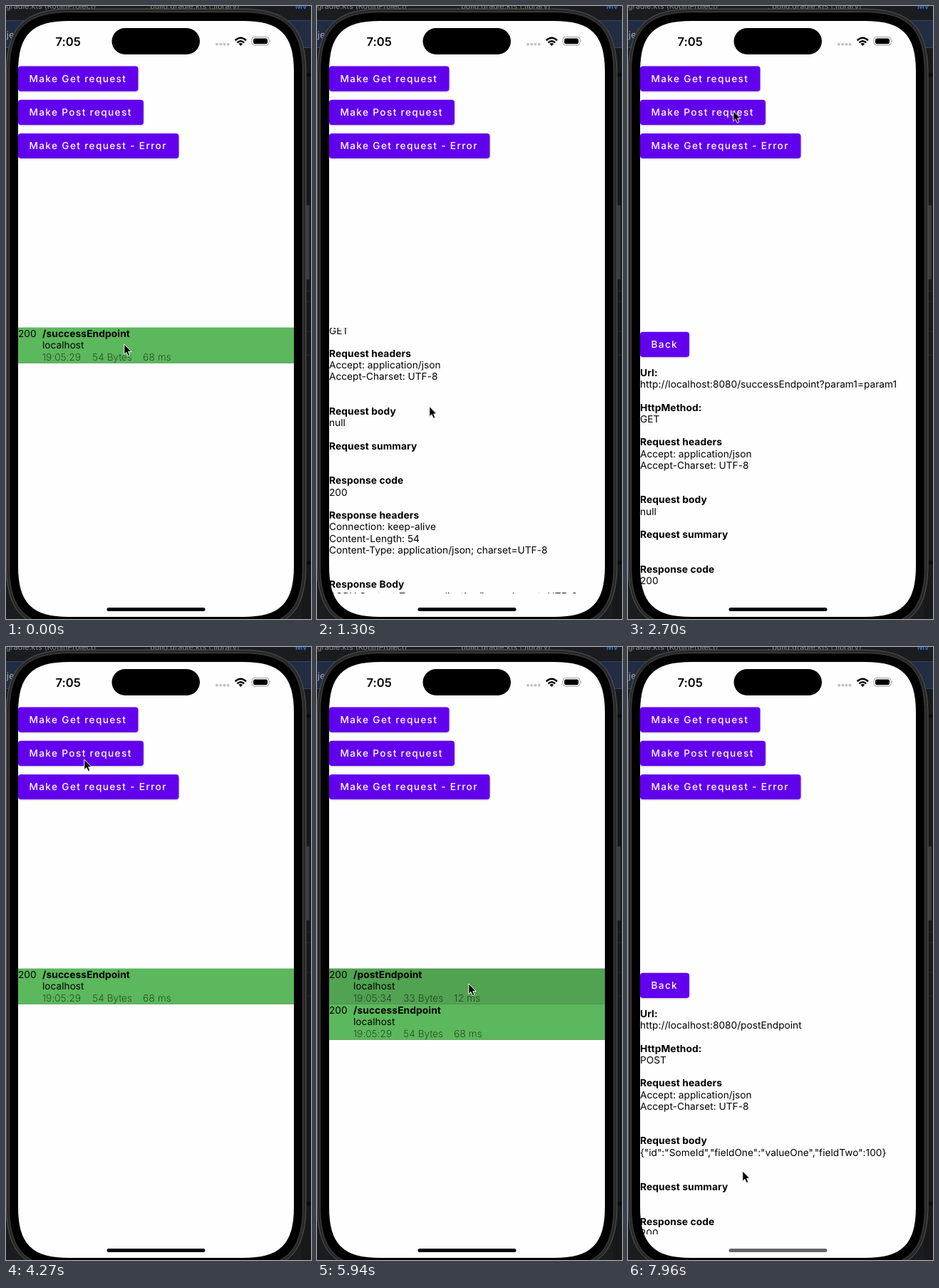
Animation, 428 px wide and 861 px high, one loop 8 s. Source, as an HTML page:

```html
<!DOCTYPE html>
<html lang="en">
<head>
<meta charset="utf-8">
<title>Request inspector</title>
<style>
html, body { margin: 0; width: 100%; height: 100%; overflow: hidden; background: #1b1c1f; }
svg { display: block; }
text { font: 400 13.65px Inter, "Liberation Sans", sans-serif; letter-spacing: .035px; white-space: pre; text-rendering: geometricPrecision; }
.b { font-weight: 700; font-size: 13.75px; letter-spacing: .1px; }
.thin { font-weight: 200; letter-spacing: .15px; fill-opacity: .85; }
.clock { font-weight: 600; font-size: 16.6px; }
.ide { font-size: 10.8px; fill: #85878b; }
.btn rect { fill: #6200ee; }
.btn .face { filter: drop-shadow(0 1px 1px rgba(0, 0, 0, .25)); }
.btn text { font-weight: 500; letter-spacing: 1.34px; fill: #fff; }
.btn .glow { fill: #fff; opacity: 0; }
.press { opacity: 0; }

/* One loop is 8 s, so 1% is 80 ms */
.cursor, .list, .get, .post, .newRow, .oldRow, .scroll, .home,
.pressOld, .pressNew, .btn .tapPost, .btn .tapBack { animation: 8s step-end infinite; }

.list { animation-name: list; }
@keyframes list {
  0%, 45.7%, 100% { visibility: visible; }
  6.45%, 74.3% { visibility: hidden; }
}
.get { animation-name: get; }
@keyframes get {
  0%, 45.7%, 100% { visibility: hidden; }
  6.45% { visibility: visible; }
}
.post { animation-name: post; }
@keyframes post {
  0% { visibility: hidden; }
  74.3%, 100% { visibility: visible; }
}
.newRow { animation-name: newRow; }
@keyframes newRow {
  0% { opacity: 0; }
  56.6%, 100% { opacity: 1; }
}
.oldRow { animation-name: oldRow; }
@keyframes oldRow {
  0% { transform: none; }
  56.6%, 100% { transform: translateY(50px); }
}
.pressOld { animation-name: pressOld; }
@keyframes pressOld {
  0%, 6.45%, 100% { opacity: 0; }
  4.2% { opacity: .07; }
  5.35% { opacity: .12; }
}
.pressNew { animation-name: pressNew; }
@keyframes pressNew {
  0%, 74.3%, 100% { opacity: 0; }
  72.1% { opacity: .07; }
  73.2% { opacity: .12; }
}
.btn .tapBack { animation-name: tapBack; }
@keyframes tapBack {
  0%, 45.7%, 100% { opacity: 0; }
  43.6% { opacity: .12; }
  44.7% { opacity: .22; }
}
.btn .tapPost { animation-name: tapPost; }
@keyframes tapPost {
  0%, 59.9%, 100% { opacity: 0; }
  54.4%, 57.7% { opacity: .14; }
  55.5% { opacity: .24; }
  58.8% { opacity: .06; }
}
.scroll { animation-name: scroll; }
@keyframes scroll {
  0% { transform: none; }
  11.8% { transform: translateY(0); animation-timing-function: steps(4); }
  16.19% { transform: translateY(-124.3px); animation-timing-function: steps(2); }
  18.44% { transform: translateY(-186px); animation-timing-function: steps(6); }
  24.94% { transform: translateY(-10px); }
  26%, 100% { transform: translateY(0); }
}
.home { animation-name: home; }
@keyframes home {
  0% { fill: #000; }
  95.06% { fill: #000; animation-timing-function: steps(4); }
  99.44%, 100% { fill: #666; }
}
.cursor { animation-name: cursor; }
@keyframes cursor {
  0% { transform: translate(165px, 474px); animation-timing-function: steps(2); }
  2.06% { transform: translate(161px, 474px); }
  6.44% { transform: translate(161px, 474px); animation-timing-function: steps(5); }
  11.8% { transform: translate(158px, 688px); animation-timing-function: steps(4); }
  16.19% { transform: translate(157px, 561.5px); animation-timing-function: steps(2); }
  18.44% { transform: translate(156px, 500px); animation-timing-function: steps(6); }
  24.94% { transform: translate(154px, 692px); animation-timing-function: steps(7); }
  32.56% { transform: translate(150px, 87px); }
  33.69% { transform: translate(147px, 146.5px); animation-timing-function: steps(2); }
  35.94% { transform: translate(113px, 287px); animation-timing-function: steps(5); }
  41.31% { transform: translate(60px, 478px); }
  45.69% { transform: translate(60px, 478px); animation-timing-function: steps(7); }
  53.31% { transform: translate(109px, 157px); animation-timing-function: steps(6); }
  59.94% { transform: translate(106px, 155px); }
  64.31% { transform: translate(166px, 167px); animation-timing-function: steps(2); }
  66.56% { transform: translate(221px, 260px); animation-timing-function: steps(3); }
  69.81% { transform: translate(212px, 472px); }
  74.31% { transform: translate(212px, 472px); animation-timing-function: steps(7); }
  81.81% { transform: translate(129px, 679px); animation-timing-function: steps(2); }
  84.06% { transform: translate(126px, 709px); }
  90.75% { transform: translate(126px, 709px); animation-timing-function: steps(3); }
  94.06% { transform: translate(61px, 665px); }
  95.06% { transform: translate(75px, 639px); animation-timing-function: steps(4); }
  99.44%, 100% { transform: translate(160px, 735px); }
}
</style>
</head>
<body>
<svg width="428" height="861" viewBox="0 0 428 861">
  <defs><clipPath id="pane"><rect x="17" y="451.7" width="387" height="373.3"/></clipPath></defs>

  <!-- editor behind the phone -->
  <rect width="428" height="861" fill="#1b1c1f"/>
  <rect y="20" width="428" height="39" fill="#222c42"/>
  <path d="M0 20.5H428M0 58.5H428" stroke="#34466d"/>
  <rect x="415" y="59" width="13" height="802" fill="#17181a"/>
  <path d="M0 97H428M0 782H428" stroke="#0b0b0c" stroke-width="5"/>
  <rect x="421" y="280" width="5" height="104" fill="#3a3b3e"/>
  <path d="M421 400H428M421 415H428M421 457H428M421 490H428" stroke="#27282b"/>
  <text class="ide" x="-4" y="4">rgradle.kts (KotlinProject)</text>
  <text class="ide" x="196" y="4">: build.gradle.kts (:library)</text>
  <text class="ide" x="406" y="4" style="fill:#3574d6;font-weight:600">Mv</text>
  <text class="ide" x="-7" y="45" style="fill:#a9abb0;font-size:13px">oje</text>

  <g id="phone"></g>
  <rect x="148.5" y="31" width="123.5" height="37" rx="18.5"/>
  <text class="clock" x="69.5" y="55.5">7:05</text>
  <path d="M296 53.7H312" stroke="#c2c2c3" stroke-width="4" stroke-linecap="round" stroke-dasharray="0 5.2"/>
  <g fill="none" stroke="#000" stroke-width="2.4">
    <path d="M321.6 48.3Q329.3 41.2 337 48.3M324.4 51.4Q329.3 46.9 334.2 51.4"/>
    <path d="M326.4 53Q329.3 50.8 332.2 53L329.3 56Z" fill="#000" stroke="none"/>
  </g>
  <rect x="345" y="43.5" width="24" height="11.6" rx="3.8" fill="none" stroke="#9b9b9b"/>
  <rect x="347" y="45.4" width="20" height="7.8" rx="2.3"/>
  <path d="M370.4 47.3Q372.2 49.3 370.4 51.3Z" fill="#9b9b9b"/>

  <g id="buttons"></g>

  <g clip-path="url(#pane)">
    <g class="list">
      <g class="oldRow" id="oldRow"></g>
      <g class="newRow" id="newRow"></g>
    </g>
    <g class="get"><g class="scroll" id="get"></g></g>
    <g class="post" id="post"></g>
  </g>

  <rect class="home" x="141.5" y="845.1" width="138" height="5" rx="2.5"/>
  <g class="cursor">
    <path d="M.8 .9V15.4L4 12.4L6.3 17.7L8.9 16.6L6.7 11.5H11Z" stroke="#fff" stroke-width="1" stroke-linejoin="round"/>
  </g>
</svg>
<script>
const LEFT = 17, PITCH = 16.22;
const add = (id, markup) => document.getElementById(id).insertAdjacentHTML('beforeend', markup);
const text = (x, y, str, cls = '') => `<text class="${cls}" x="${x}" y="${y}">${str}</text>`;

// Rectangle whose corners blend smoothly into its sides
function smoothRect(x, y, w, h, r, paint) {
  const e = 1.3 * r, a = .35 * r, b = e - a;
  return `<path ${paint} d="M${x + e} ${y}h${w - 2 * e}c${b} 0 ${e} ${a} ${e} ${e}` +
    `v${h - 2 * e}c0 ${b} ${-a} ${e} ${-e} ${e}h${2 * e - w}c${-b} 0 ${-e} ${-a} ${-e} ${-e}` +
    `v${2 * e - h}c0 ${-b} ${a} ${-e} ${e} ${-e}z"/>`;
}

function button(y, width, label, tap = '') {
  const rect = cls => `<rect class="${cls}" x="${LEFT}" y="${y}" width="${width}" height="35.2" rx="4"/>`;
  return `<g class="btn">${rect('face')}${rect('glow ' + tap)}${text(32.5, y + 22.4, label)}</g>`;
}

function row(path, time, size, span, press) {
  const box = `x="${LEFT}" y="451.5" width="387" height="50.3"`;
  return `<rect ${box} fill="#5cb85c"/><rect ${box} class="press ${press}"/>` +
    `<path d="M17 501.6H404" stroke="#000" stroke-opacity=".25" stroke-width=".7"/>` +
    text(LEFT, 465, '200') + text(51, 465, path, 'b') + text(51, 481.4, 'localhost') +
    text(51, 497.8, time, 'thin') + text(121.3, 497.8, size, 'thin') + text(192.3, 497.8, span, 'thin');
}

// Lines that start with * are headings
function details(lines) {
  return button(457.8, 69, 'Back', 'tapBack') + lines.map((s, i) => {
    const head = s[0] === '*';
    return s && text(LEFT, 520 + i * PITCH, head ? s.slice(1) : s, head ? 'b' : '');
  }).join('');
}

const call = (url, method) => ['*Url:', 'http://localhost:8080/' + url, '', '*HttpMethod:', method, '',
  '*Request headers', 'Accept: application/json', 'Accept-Charset: UTF-8', '', '', '*Request body'];
const reply = ['*Request summary', '', '', '*Response code', '200', ''];

add('phone', smoothRect(.5, 4, 420.5, 872, 71, 'fill="#29292a" stroke="#555556"') +
  smoothRect(4.5, 8.5, 412, 863, 66.5, 'stroke="#454546"') +
  smoothRect(17, 21, 387, 837, 55, 'fill="#fefefe"'));
add('buttons', button(84.5, 168.5, 'Make Get request') +
  button(131.7, 176, 'Make Post request', 'tapPost') +
  button(178.9, 225.5, 'Make Get request - Error'));
add('oldRow', row('/successEndpoint', '19:05:29', '54 Bytes', '68 ms', 'pressOld'));
add('newRow', row('/postEndpoint', '19:05:34', '33 Bytes', '12 ms', 'pressNew'));
add('get', details([...call('successEndpoint?param1=param1', 'GET'), 'null', '', ...reply,
  '*Response headers', 'Connection: keep-alive', 'Content-Length: 54',
  'Content-Type: application/json; charset=UTF-8', '', '', '*Response Body',
  'BODY Content-Type: application/json; charset=UTF-8', 'BODY START',
  '{"id":"SomeId","fieldOne":"valueOne","fieldTwo":"100"}', 'BODY END']));
add('post', details([...call('postEndpoint', 'POST'),
  '{"id":"SomeId","fieldOne":"valueOne","fieldTwo":100}', '', '', ...reply]));
</script>
</body>
</html>
```
